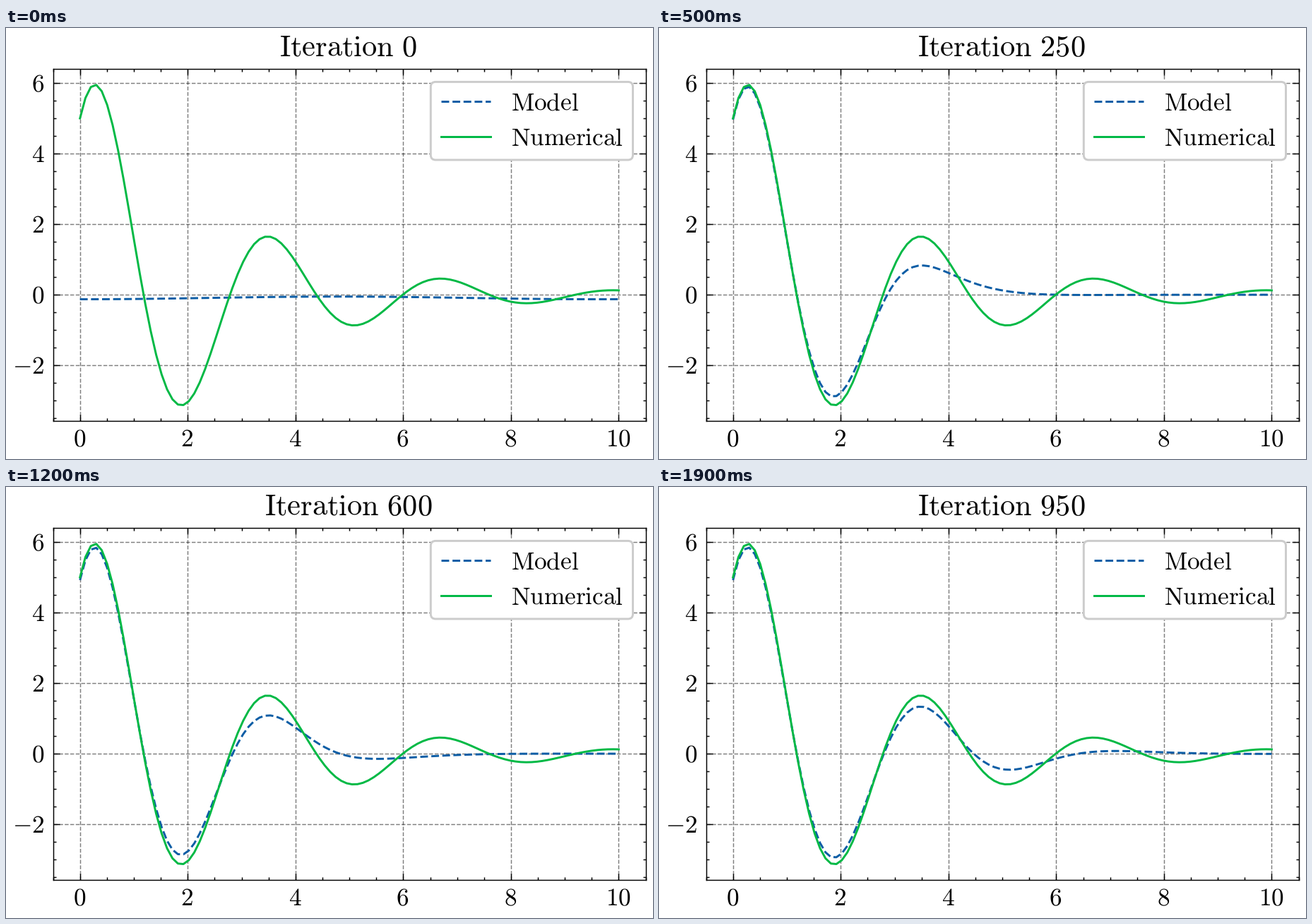
Write a matplotlib script that moves like this. It is 916 by 611 pixels and loops after 2000 ms.

```python
import numpy as np
import matplotlib.pyplot as plt
from matplotlib.animation import FuncAnimation
from matplotlib.lines import Line2D
from matplotlib.patches import FancyBboxPatch
from matplotlib.ticker import MultipleLocator

W, H, DPI = 916, 611, 256
FRAMES, INTERVAL = 20, 100
PX = 72 / DPI  # points per pixel
LINE, THIN = 2.95 * PX, 1.475 * PX
BLUE, GREEN = "#0C5DA5", "#00B945"
LEFT, RIGHT, TOP, BOTTOM = 66.6, 905.6, 58.0, 557.2

plt.rcParams["mathtext.fontset"] = "cm"
plt.rcParams["text.hinting"] = "none"


def oscillator(x):
    """Underdamped oscillator with y(0) = 5, y'(0) = 7."""
    w = np.sqrt(4 - 0.4 ** 2)
    return np.exp(-0.4 * x) * (5 * np.cos(w * x) + 9 / w * np.sin(w * x))


def model(x, k):
    """Fit after k steps: right up to a moving front, slow and weak beyond."""
    early = max(0, (5 - k) / 3) ** 2
    late = max(0, (k - 5) / 14)

    # Beyond the slow-down point the phase runs at a reduced rate
    slow = 3.5 - 1.9 * early + late + 1.8 * late ** 2
    soft = 0.5 + 0.5 * late
    rate = 0.35 + 0.1 * late
    phase = x - (1 - rate) * soft * np.logaddexp(0, (x - slow) / soft)

    # Beyond the front the amplitude fades out
    front = 3.65 - 1.85 * early + 0.55 * late + 1.1 * late ** 2
    fade = 1 / (1 + np.exp((x - front) / (0.72 + 0.53 * late)))

    untrained = np.exp(-2 * k)
    start = -0.09 - 0.038 * np.cos(2 * np.pi * x / 9.6)
    return (1 - untrained) * fade * oscillator(phase) + untrained * start


x = np.linspace(0, 10, 100)
exact = oscillator(x)

fig = plt.figure(figsize=(W / DPI, H / DPI), dpi=DPI, facecolor="white")
ax = fig.add_axes([LEFT / W, 1 - BOTTOM / H, (RIGHT - LEFT) / W,
                   (BOTTOM - TOP) / H])
ax.set_xlim(-0.5, 10.5)
margin = 0.05 * np.ptp(exact)
ax.set_ylim(exact.min() - margin, exact.max() + margin)
for axis in (ax.xaxis, ax.yaxis):
    axis.set_major_locator(MultipleLocator(2))
    axis.set_minor_locator(MultipleLocator(0.5))
ax.tick_params(which="both", direction="in", top=True, right=True, width=THIN,
               labelbottom=False, labelleft=False)
ax.tick_params(which="major", length=3 * LINE)
ax.tick_params(which="minor", length=1.5 * LINE)
for side in ax.spines.values():
    side.set_linewidth(THIN)
ax.set_axisbelow(True)
ax.grid(True, color="k", alpha=0.5, ls="--", lw=THIN)

model_line, = ax.plot(x, model(x, 0), "--", color=BLUE, lw=LINE)
ax.plot(x, exact, color=GREEN, lw=LINE)


def roman(s):
    return r"$\mathrm{%s}$" % s.replace(" ", r"\ ")


def label(px, py, s, ha="center", em=35.3):
    """Text with its baseline at a pixel position from the top left."""
    return fig.text(px / W, 1 - py / H, s, ha=ha, va="baseline",
                    fontsize=em * PX, zorder=10)


for v in range(0, 11, 2):
    label(LEFT - 1 + (v + 0.5) * (RIGHT - LEFT) / 11, 593, roman(str(v)))
y_low, y_high = ax.get_ylim()
for v in range(-2, 7, 2):
    py = TOP + (y_high - v) / (y_high - y_low) * (BOTTOM - TOP)
    label(54.3, py + 12, "$%d$" % v, ha="right")

# Legend, laid out in pixels
fig.add_artist(FancyBboxPatch(
    (601.3, H - 187), 286.2, 110.6, boxstyle="round,pad=0,rounding_size=7",
    fc="white", ec="0.8", lw=LINE, transform=None, zorder=8))
for name, color, ls, py in (("Model", BLUE, "--", 103.5),
                            ("Numerical", GREEN, "-", 153.7)):
    fig.add_artist(Line2D([615.6, 686.2], [H - py] * 2, color=color, ls=ls,
                          lw=LINE, transform=None, zorder=9))
    label(715, py + 13, roman(name), ha="left")

title = label((LEFT + RIGHT) / 2 - 1.3, 40, "", em=42.4)


def update(k):
    model_line.set_ydata(model(x, k))
    title.set_text(roman("Iteration %d" % (50 * k)))
    return model_line, title


anim = FuncAnimation(fig, update, frames=FRAMES, interval=INTERVAL,
                     init_func=lambda: update(0), repeat=True, repeat_delay=0)
plt.show()
```
